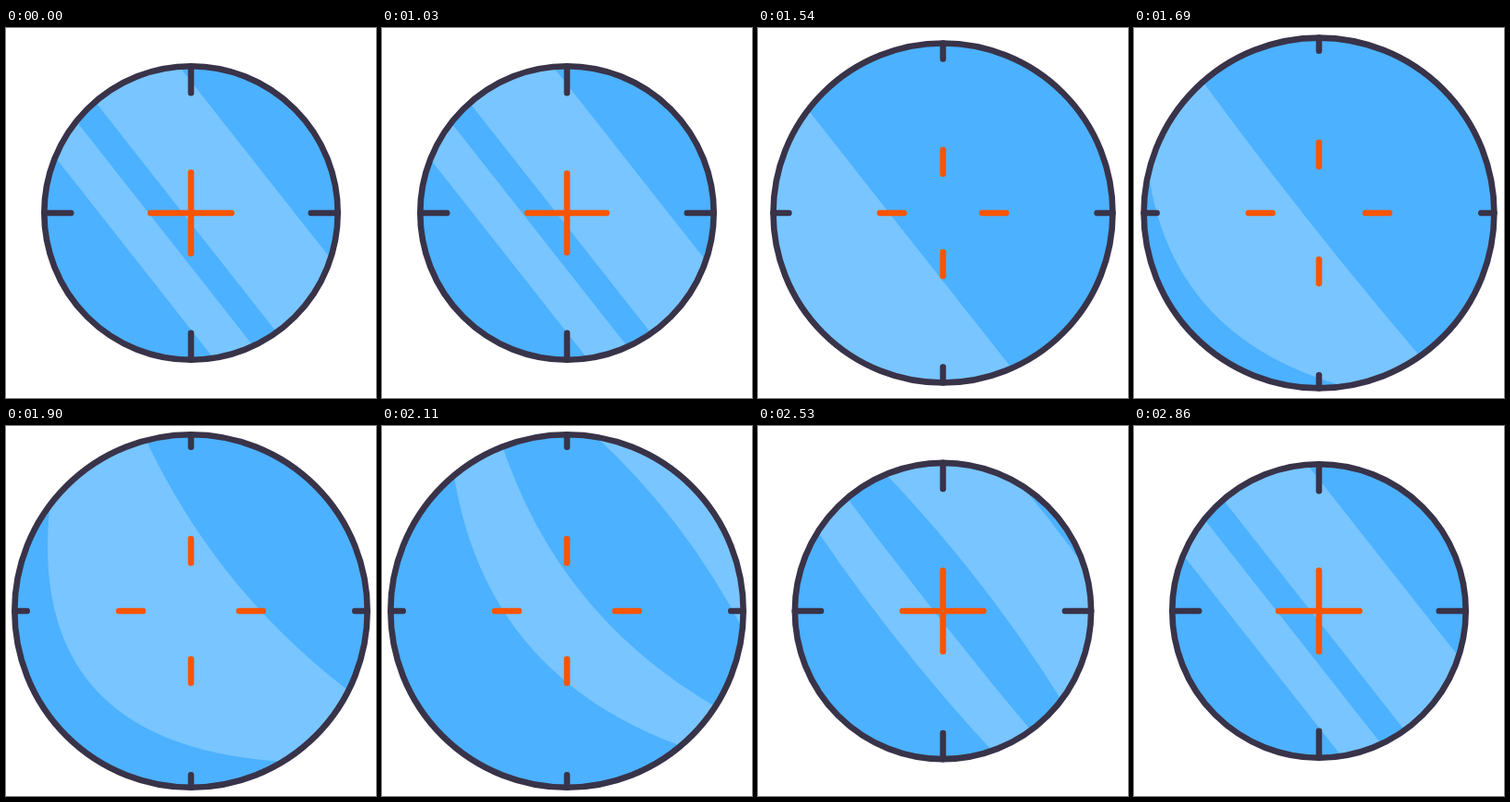
Recreate the animation shown at these times as an HTML page. Size 400 px wide and 400 px high, loop 2.89 s.

```html
<!DOCTYPE html>
<html lang="en">
<head>
<meta charset="utf-8">
<title>Scope</title>
<style>
html, body { margin: 0; width: 100%; height: 100%; overflow: hidden; background: #fff; }
svg { display: block; width: 100%; height: 100%; }
path, circle { fill: none; stroke-width: 6.6; stroke-linecap: round; }
#lens { fill: #4cb1ff; }
#glare path { fill: #78c5ff; stroke: none; }
#ring, #ticks { stroke: #393349; }
#cross { stroke: #f75502; }
</style>
</head>
<body>
<svg viewBox="-200 -200 400 400">
  <clipPath id="clip"><circle id="hole"/></clipPath>
  <circle id="lens"/>
  <g clip-path="url(#clip)">
    <g id="glare" transform="matrix(.619 .786 .786 -.619 0 0)">
      <path id="wide"/>
      <path id="narrow"/>
    </g>
  </g>
  <path id="ticks"/>
  <circle id="ring"/>
  <path id="cross"/>
</svg>
<script>
const LOOP = 2890, START = 1030, STEP = 30, CAP = 3.3;
const $ = id => document.getElementById(id);

// Edges of the two glare bands: offset across the lens and curvature (1/10000).
const times = [1000, 1030, 1360, 1500, 1690, 1900, 2180, 2320, 2650, 2860];
const edges = {
  a: { pos: [88, 86, -30, -48, -14, 57, 320, 290, 98, 88], bend: [0, 0, 0, 0, 1, 7, -12, -12, 0, 0] },
  b: { pos: [-7, -9, -190, -188, -158, -134, 200, 174, 2, -7], bend: [0, 0, 0, 10, 21, 28, -13, -12, 0, 0] },
  c: { pos: [-36, -38, -230, -245, -240, -230, 70, 49, -29, -36], bend: [0, 0, 0, 10, 21, 28, 6, 4, 0, 0] },
  d: { pos: [-78, -80, -300, -330, -330, -320, -8, -25, -71, -78], bend: [0, 0, 0, 10, 21, 28, 12, 10, 0, 0] }
};
const barTimes = [1000, 1030, 1360, 1430, 2320, 2620];
const barLengths = [50.3, 48.3, 34.6, 32.4, 32.4, 50.3];

// Smooth interpolation that never overshoots its keys.
function sample(xs, ys, x) {
  const last = xs.length - 1;
  if (x <= xs[0]) return ys[0];
  if (x >= xs[last]) return ys[last];
  const slope = i => (ys[i + 1] - ys[i]) / (xs[i + 1] - xs[i]);
  const tangent = i => {
    if (i === 0 || i === last) return 0;
    const p = slope(i - 1), q = slope(i);
    return p * q > 0 ? 2 * p * q / (p + q) : 0;
  };
  let i = 0;
  while (x > xs[i + 1]) i++;
  const h = xs[i + 1] - xs[i], s = (x - xs[i]) / h, r = 1 - s;
  return ys[i] * r * r * (1 + 2 * s) + ys[i + 1] * s * s * (3 - 2 * s)
    + h * s * r * (tangent(i) * r - tangent(i + 1) * s);
}

function ease(t, from, to) {
  const x = Math.min(1, Math.max(0, (t - from) / (to - from)));
  return x < .5 ? 4 * x ** 3 : 1 - 4 * (1 - x) ** 3;
}

// A parabola as one quadratic curve.
function edgeCurve(edge, t) {
  const half = 260, vertex = -10;
  const pos = sample(times, edge.pos, t), k = sample(times, edge.bend, t) / 1e4;
  const y = x => pos + k * (x - vertex) ** 2;
  return { half, left: y(-half), right: y(half), mid: y(0) - k * half * half };
}

function band(upper, lower, t) {
  const u = edgeCurve(upper, t), l = edgeCurve(lower, t), h = u.half;
  return `M${-h} ${u.left}Q0 ${u.mid} ${h} ${u.right}L${h} ${l.right}Q0 ${l.mid} ${-h} ${l.left}Z`;
}

const spokes = (from, to) =>
  `M${from} 0H${to}M${-from} 0H${-to}M0 ${from}V${to}M0 ${-from}V${-to}`;

function draw(t) {
  const open = ease(t, 985, 1885) - ease(t, 2150, 2640);
  const radius = 158.7 + 32 * open;
  for (const id of ['lens', 'hole', 'ring']) $(id).setAttribute('r', radius);
  $('ticks').setAttribute('d', spokes(126.5 + 47.5 * open + CAP, radius));

  const mid = 21.85 + 43.1 * open;
  const reach = sample(barTimes, barLengths, t) / 2 - CAP;
  $('cross').setAttribute('d', spokes(mid - reach, mid + reach));

  $('wide').setAttribute('d', band(edges.a, edges.b, t));
  $('narrow').setAttribute('d', band(edges.c, edges.d, t));
}

const origin = performance.now();
function frame() {
  const t = (performance.now() - origin) % LOOP;
  draw(t < START ? 0 : START + Math.floor((t - START) / STEP) * STEP);
  requestAnimationFrame(frame);
}
frame();
</script>
</body>
</html>
```
